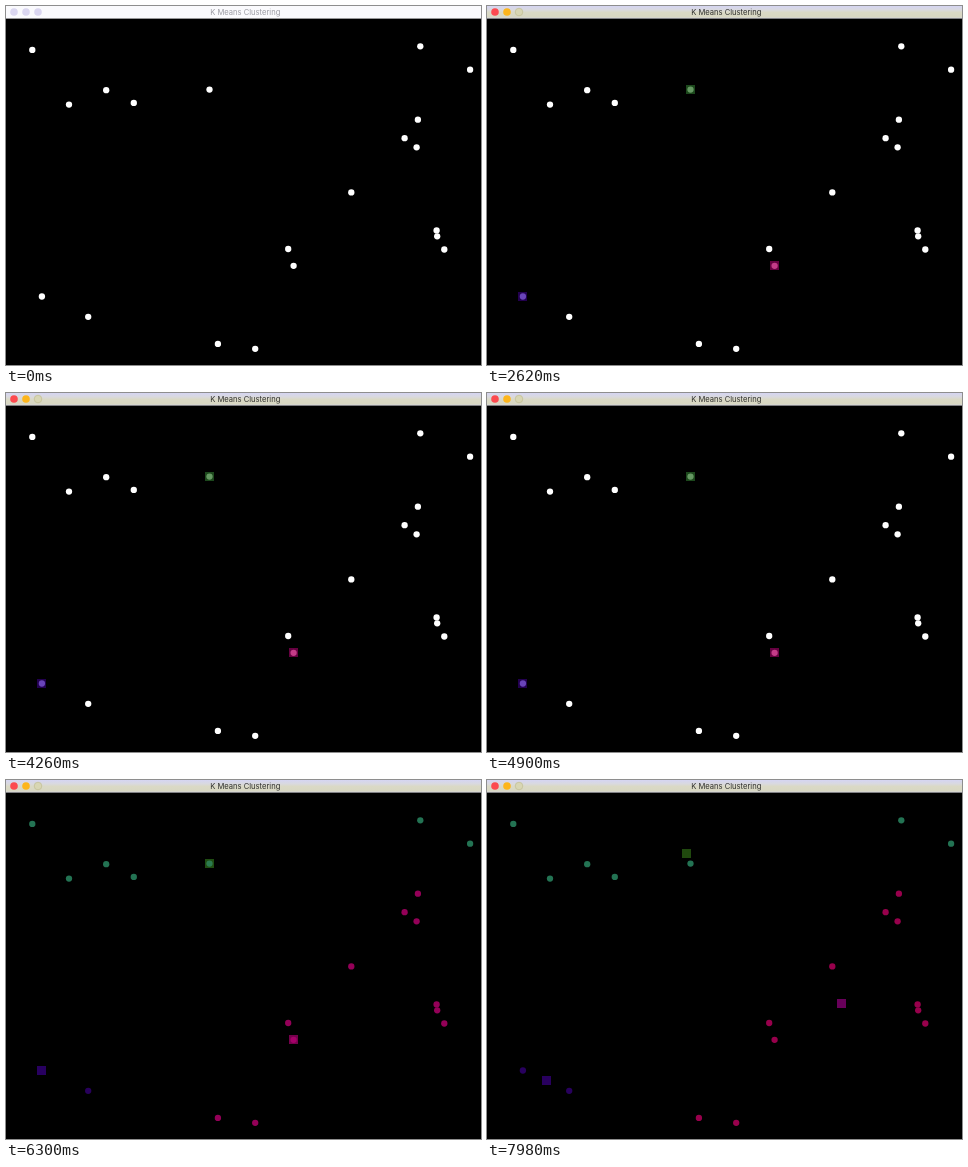
Recreate the animation shown at these times as an HTML page. Size 475 by 359 pixels, loop 8 s.

```html
<!DOCTYPE html>
<html lang="en">
<head>
<meta charset="utf-8">
<title>K Means Clustering</title>
<style>
  html, body { margin: 0; width: 100%; height: 100%; overflow: hidden; background: #000; }
  svg { display: block; width: 475px; height: 359px; }
  text { font: 7.6px Inter, "Liberation Sans", sans-serif; text-anchor: middle; }
</style>
</head>
<body>
<svg viewBox="0 0 475 359">
  <defs>
    <linearGradient id="active" x2="0" y2="1">
      <stop offset="0" stop-color="#d5d5f2"/>
      <stop offset=".3" stop-color="#d9d9df"/>
      <stop offset=".5" stop-color="#dad9c6"/>
      <stop offset=".85" stop-color="#d8d7c2"/>
      <stop offset="1" stop-color="#d4d4dc"/>
    </linearGradient>
  </defs>
  <rect width="475" height="359"/>
  <rect id="bar" width="475" height="12.6"/>
  <g id="lights"></g>
  <text id="title" x="239.3" y="8.8">K Means Clustering</text>
  <g id="squares"></g>
  <g id="dots"></g>
</svg>
<script>
const LOOP = 8000;
const $ = id => document.getElementById(id);

function add(parent, tag, attrs) {
  const el = document.createElementNS('http://www.w3.org/2000/svg', tag);
  for (const k in attrs) el.setAttribute(k, attrs[k]);
  return parent.appendChild(el);
}

// Points by cluster; the first of each seeds its centroid.
const clusters = [
  [[203.5, 83.6], [26.3, 43.9], [63, 98.6], [100.2, 84.2], [127.8, 96.9], [414.3, 40.3], [464.1, 63.7]],
  [[287.6, 259.8], [411.9, 113.7], [398.6, 132.2], [410.6, 141.3], [345.3, 186.4], [430.6, 224.4],
   [431.2, 230.3], [438.3, 243.5], [282.2, 243], [211.9, 337.9], [249.2, 342.8]],
  [[35.9, 290.5], [82.2, 310.8]]
];
const mean = (pts, axis) => pts.reduce((sum, p) => sum + p[axis], 0) / pts.length;
const centers = clusters.map(pts => [mean(pts, 0), mean(pts, 1)]);

// Colours per cluster: square, seed dot, other dots.
const idle = clusters.map(() => ['none', '#fff', '#fff']);
const states = [
  { at: 0, colors: idle },
  { at: 2520, active: true, colors: [
    ['#1c481c', '#659862', '#fff'], ['#650040', '#c43c88', '#fff'], ['#22004f', '#6944b8', '#fff']] },
  { at: 5040, active: true, colors: [
    ['#1f4d12', '#2c7a50', '#237353'], ['#74004c', '#a40068', '#940058'], ['#280060', '#280060', '#28005c']] },
  { at: 7560, active: true, moved: true, colors: [
    ['#20490e', '#237353', '#237353'], ['#68005a', '#98004c', '#98004c'], ['#28005e', '#28005e', '#28005e']] }
];

const lights = [8, 20, 32].map(cx => add($('lights'), 'circle', { cx, cy: 6, r: 3.8 }));
const squares = clusters.map(() => add($('squares'), 'rect', { width: 9, height: 9 }));
const dots = clusters.map(pts => pts.map(([cx, cy]) => add($('dots'), 'circle', { cx, cy, r: 3.15 })));

function show(s) {
  $('bar').setAttribute('fill', s.active ? 'url(#active)' : '#fafafd');
  $('title').setAttribute('fill', s.active ? '#30302e' : '#9b9ba3');
  const lamp = s.active ? ['#fc4a50', '#fdb51c', '#d8d6b4'] : ['#dad6f0', '#dad6f0', '#dad6f0'];
  lights.forEach((el, i) => el.setAttribute('fill', lamp[i]));
  lights[2].setAttribute('stroke', s.active ? '#bcb98c' : 'none');
  lights[2].setAttribute('stroke-width', 0.6);

  s.colors.forEach(([box, seed, rest], i) => {
    const [x, y] = s.moved ? centers[i] : clusters[i][0];
    squares[i].setAttribute('x', Math.round(x - 4.5));
    squares[i].setAttribute('y', Math.round(y - 4.5));
    squares[i].setAttribute('fill', box);
    dots[i].forEach((el, j) => el.setAttribute('fill', j ? rest : seed));
  });
}

let current;
const start = performance.now();
function frame() {
  const t = (performance.now() - start) % LOOP;
  const next = states.filter(s => s.at <= t).pop();
  if (next !== current) show(current = next);
  requestAnimationFrame(frame);
}
frame();
</script>
</body>
</html>
```
